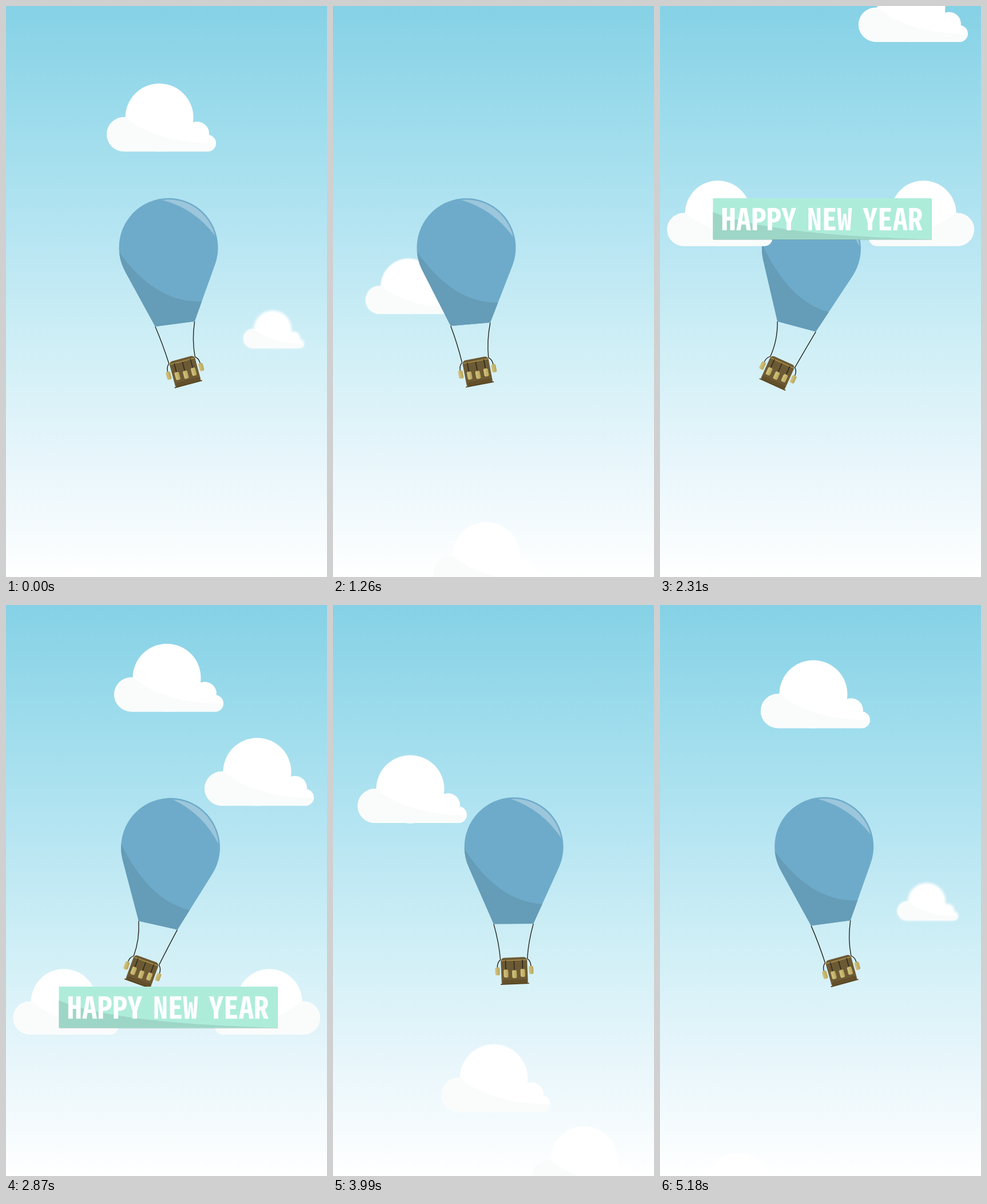
An HTML page with a canvas for the animation above (5.25 s loop, 561 by 998 pixels).

```html
<!DOCTYPE html>
<html lang="en">
<head>
<meta charset="utf-8">
<title>Happy New Year balloon</title>
<style>
html, body { margin: 0; width: 100%; height: 100%; overflow: hidden; background: #fff; }
canvas { display: block; }
</style>
</head>
<body>
<canvas id="stage" width="561" height="998"></canvas>
<script>
const ctx = document.getElementById('stage').getContext('2d');
const W = 561, H = 998, LOOP = 5250, STEP = 70, RAD = Math.PI / 180;

const sky = ctx.createLinearGradient(0, 0, 0, H);
['#86d1e6', '#9ddcec', '#b6e5f2', '#d0eff6', '#e8f6fb', '#ffffff']
  .forEach((c, i, all) => sky.addColorStop(i / (all.length - 1), c));

// left edge, time at mid-screen, size
const clouds = [[176, 491, 1], [57, 1286, .815], [347, 3200, 1], [189, 3485, 1], [43, 4272, 1], [415, 5163, .555]];

// time, balloon x, tilt in degrees
const keys = [[0, 284, -7.4], [1260, 233, -5], [2310, 264.5, 15], [2870, 287.5, 12.6], [3430, 308.3, 10.5], [4550, 310.5, -9.9]];

function keyAt(i) {
  const n = keys.length, [t, ...values] = keys[(i + n) % n];
  return [t + LOOP * Math.floor(i / n), ...values];
}

// smooth periodic curve through the keys
function pose(t) {
  const i = keys.findLastIndex(k => k[0] <= t);
  const [a, b, c, d] = [-1, 0, 1, 2].map(k => keyAt(i + k));
  const slope = (p, q, k) => (q[k] - p[k]) / (q[0] - p[0]);
  const tangent = (p, q, r, k) =>
    (slope(p, q, k) * (r[0] - q[0]) + slope(q, r, k) * (q[0] - p[0])) / (r[0] - p[0]);
  const h = c[0] - b[0], s = (t - b[0]) / h, r = 1 - s;
  return [1, 2].map(k => b[k] * (1 + 2 * s) * r * r + c[k] * s * s * (3 - 2 * s)
    + h * s * r * (tangent(a, b, c, k) * r - tangent(b, c, d, k) * s));
}

// centre height of something sinking past, or null when it is away
function sink(t, mid, reach, rate) {
  const u = ((t - mid + 1.5 * LOOP) % LOOP) - LOOP / 2;
  return Math.abs(u * rate) < Math.PI / 2 ? 507 + reach * Math.sin(u * rate) : null;
}

function spin(x, y, deg) {
  const c = Math.cos(deg * RAD), s = Math.sin(deg * RAD);
  return [x * c - y * s, x * s + y * c];
}

const add = ([x, y], [dx, dy]) => [x + dx, y + dy];

function local(x, y, draw) {
  ctx.save();
  ctx.translate(x, y);
  draw();
  ctx.restore();
}

function box(x, y, w, h, r, fill) {
  ctx.fillStyle = fill;
  ctx.beginPath();
  ctx.roundRect(x, y, w, h, r);
  ctx.fill();
}

const puff = new Path2D();
[[92, 59.5, 59.5], [30, 88.7, 30], [158, 87.5, 21], [176.5, 104.2, 14.5]].forEach(([x, y, r]) => {
  puff.moveTo(x + r, y);
  puff.arc(x, y, r, 0, 7);
});
puff.rect(30, 89, 146.5, 29.7);
const puffShade = new Path2D('M-2 58H33Q85 104 193 105V121H-2Z');

function cloud(x, top, sx, sy) {
  const blur = (1 - sy) * 4.5;
  local(x, top, () => {
    ctx.scale(sx, sy);
    if (blur > .5) ctx.filter = `blur(${blur}px)`;
    ctx.fillStyle = '#fff';
    ctx.fill(puff);
    ctx.clip(puff);
    ctx.filter = 'none';
    ctx.fillStyle = '#fafcfc';
    ctx.fill(puffShade);
  });
}

function envelope(x, y, necks, turn) {
  const R = 86.5;
  // the sides run from the neck corners along tangents of the dome
  const [left, right] = necks.map(([nx, ny], i) => {
    const dx = nx - x, dy = ny - y;
    const a = Math.atan2(dy, dx) + (i ? -1 : 1) * Math.acos(R / Math.hypot(dx, dy));
    return { a, x: dx, y: dy };
  });
  local(x, y, () => {
    const body = new Path2D();
    body.arc(0, 0, R, left.a, right.a + 2 * Math.PI);
    body.lineTo(right.x, right.y);
    body.lineTo(left.x, left.y);
    body.closePath();
    ctx.fillStyle = '#6eabca';
    ctx.fill(body);
    ctx.clip(body);

    const mix = (p, q) => p + .65 * (q - p);
    const ex = mix(R * Math.cos(right.a), right.x), ey = mix(R * Math.sin(right.a), right.y);
    ctx.fillStyle = '#659cb7';
    ctx.beginPath();
    ctx.moveTo(...spin(-87, 2, turn));
    ctx.quadraticCurveTo(...spin(-28, 96, turn), ex, ey);
    ctx.lineTo(ex + 40, ey);
    ctx.lineTo(90, 170);
    ctx.lineTo(-100, 170);
    ctx.fill();

    ctx.rotate(turn * RAD);
    ctx.fillStyle = '#9bc6db';
    ctx.beginPath();
    ctx.arc(0, 0, 84, -93.5 * RAD, -10.5 * RAD);
    ctx.quadraticCurveTo(50, -65, -5.2, -83.8);
    ctx.fill();
  });
}

function line(from, ctrl, to) {
  ctx.beginPath();
  ctx.moveTo(...from);
  ctx.quadraticCurveTo(...ctrl, ...to);
  ctx.stroke();
}

function basket(x, y, tilt) {
  const bag = ctx.createLinearGradient(-4, 0, 4, 0);
  bag.addColorStop(0, '#d3c47f');
  bag.addColorStop(1, '#b9a65c');
  local(x, y, () => {
    ctx.rotate(tilt * RAD);
    box(-23, -25, 46, 46, [6, 6, 3, 3], '#6c5a34');
    box(-21, 14, 43, 7, 2, '#63502b');
    box(-25, 20.2, 50, 1.8, .8, '#54431f');
    box(-22, -21, 44, 1.7, .8, '#a78d48');
    for (let i = -2; i <= 2; i++) {
      const outer = Math.abs(i) > 1;
      local(14.7 * i, 4.1 - 1.5 * i * i, () => {
        line([outer ? -3 * i : 0, outer ? -20 : -23], [0, -16], [0, -6]);
        box(-4, -7, 8, 14, 2.5, bag);
      });
    }
  });
}

function balloon(t) {
  const [x, tilt] = pose(t);
  const y = 422.8 + .08 * tilt;
  const neck = [x - 1 - 1.65 * tilt, 557.3 + .2 * tilt];
  const hang = [x - 3.95 * tilt, 641 + .08 * tilt];
  const swing = 1.75 * tilt - 2;
  const necks = [-1, 1].map(s => add(neck, spin(s * 34.7, 0, tilt)));
  ctx.strokeStyle = '#26241f';
  ctx.lineWidth = 1.4;
  necks.forEach((n, i) => {
    const s = i ? 1 : -1;
    line(n, add(n, spin(-s * 9, 32, tilt)), add(hang, spin(s * 23.5, -22, swing)));
  });
  envelope(x, y, necks, tilt / 2);
  basket(...hang, swing);
}

const WORDS = 'HAPPY NEW YEAR';
ctx.wordSpacing = '-8px';
// the narrowest installed face gives the tallest letters in the ribbon
const face = ['Noto Sans Mono CJK JP', 'Noto Sans CJK JP', 'Noto Sans', 'Roboto', 'Lato'].map(name => {
  const font = size => `bold ${size}px "${name}", sans-serif`;
  ctx.font = font(50);
  const m = ctx.measureText(WORDS), cap = m.actualBoundingBoxAscent;
  const fit = Math.min(48 / cap, 352 / m.width);
  return { font: font(50 * fit), cap: cap * fit };
}).reduce((a, b) => b.cap > a.cap ? b : a);

function banner(top) {
  cloud(12.5, top, .963, .963);
  cloud(549, top, -.963, .963);
  local(92.5, Math.round(top + 31), () => {
    box(1, 1, 381.5, 72, 0, 'rgba(110,150,140,.4)');
    box(0, 0, 381.5, 72, 0, '#aeecda');
    ctx.fillStyle = '#9dd6c6';
    ctx.beginPath();
    ctx.moveTo(0, 24);
    ctx.bezierCurveTo(70, 54, 220, 68, 381, 71.5);
    ctx.lineTo(0, 72);
    ctx.fill();
    ctx.fillStyle = '#fff';
    ctx.font = face.font;
    ctx.textAlign = 'center';
    ctx.fillText(WORDS, 190.5, 36.7 + face.cap / 2);
  });
}

function frame() {
  const t = Math.floor(performance.now() / STEP) * STEP % LOOP;
  ctx.fillStyle = sky;
  ctx.fillRect(0, 0, W, H);
  for (const [x, mid, size] of clouds) {
    const y = sink(t, mid, 607, .0011);
    if (y !== null) cloud(x, y - 59.3 * size, size, size);
  }
  balloon(t);
  const y = sink(t, 2554, 588, .00102);
  if (y !== null) banner(y - 57);
  requestAnimationFrame(frame);
}
requestAnimationFrame(frame);
</script>
</body>
</html>
```
